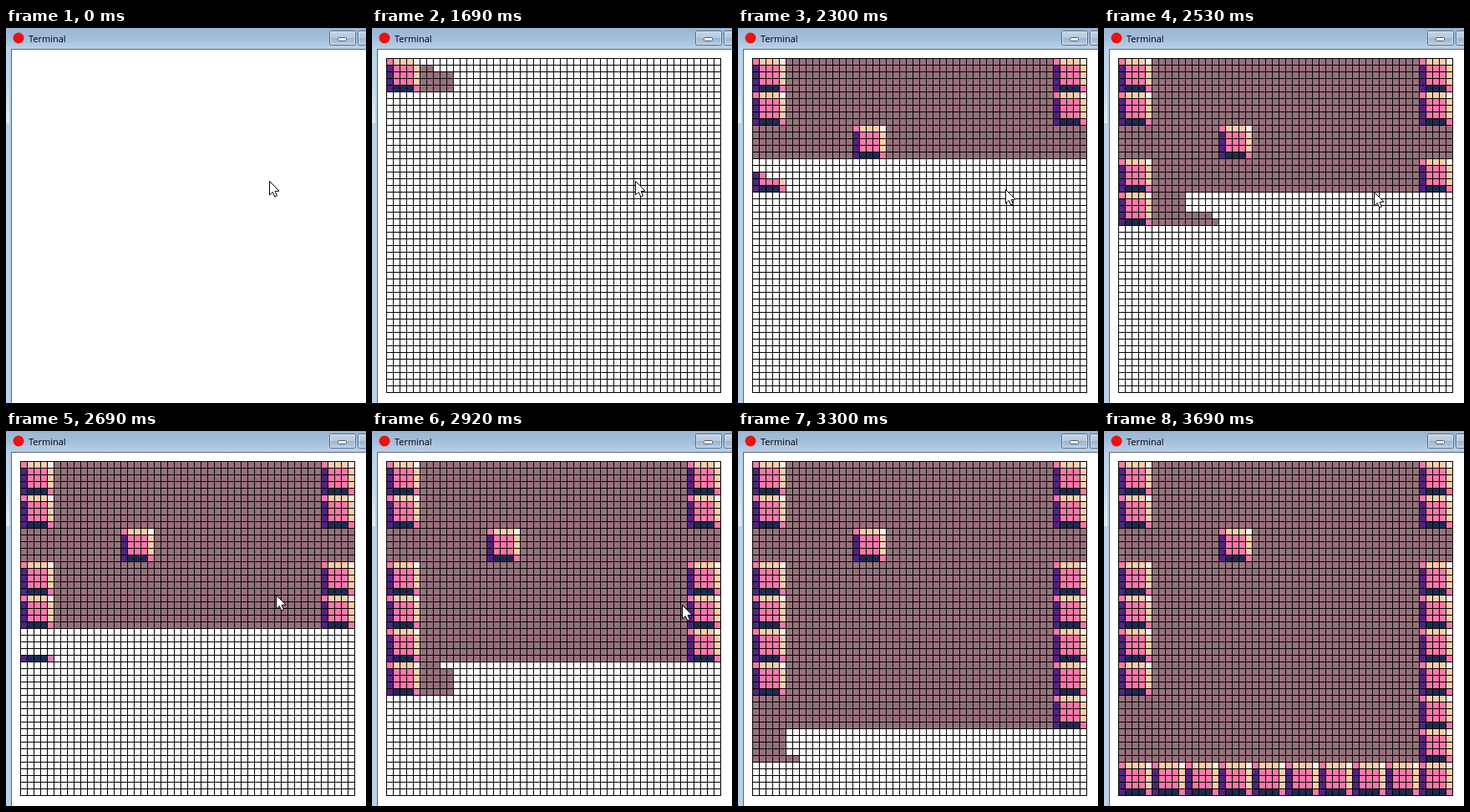
Write an HTML page with a canvas that moves like this. It is 431x449 px and loops after 4300 ms.

```html
<!DOCTYPE html>
<html lang="en">
<head>
<meta charset="utf-8">
<title>Tile map</title>
<style>
  html, body { margin: 0; width: 100%; height: 100%; overflow: hidden; background: #fff; }
  canvas { display: block; }
</style>
</head>
<body>
<canvas id="stage" width="431" height="449"></canvas>
<script>
const ctx = document.getElementById("stage").getContext("2d");
const W = 431, H = 449, LOOP = 4300;
const LEFT = 17, TOP = 36, CELL = 8, SIDE = 50, TILE = 5, PER_TILE = TILE * TILE;
const FIRST = 22; // tick at which the grid appears, 13 ticks a second

const COLORS = { k: "#ff77a8", p: "#ffccaa", w: "#fff1e8", u: "#50247f", n: "#1d2b53", f: "#98717c" };
const WALL = ["kpppw", "ukkkp", "ukkkp", "ukkkp", "unnnk"];
const MAP = [
  "#........#",
  "#........#",
  "...#......",
  "#........#",
  "#........#",
  "#........#",
  "#........#",
  ".........#",
  ".........#",
  "##########"
];

// [tick, value...]
const FILL = [[22, 42], [26, 367], [33, 1059], [38, 1548], [43, 2027], [48, 2500]];
const POINTER = [[22, 315, 183], [26, 315, 189], [33, 323, 196], [35, 323, 196], [38, 371, 208], [41, 434, 224]];

function sample(keys, tick) {
  if (tick <= keys[0][0]) return keys[0].slice(1);
  for (let i = 1; i < keys.length; i++) {
    const a = keys[i - 1], b = keys[i];
    if (tick <= b[0]) {
      const u = (tick - a[0]) / (b[0] - a[0]);
      return a.slice(1).map((v, j) => Math.round(v + (b[j + 1] - v) * u));
    }
  }
  return keys[keys.length - 1].slice(1);
}

function rect(x, y, w, h, fill) {
  ctx.fillStyle = fill;
  ctx.fillRect(x, y, w, h);
}

function vertical(y0, y1, ...stops) {
  const g = ctx.createLinearGradient(0, y0, 0, y1);
  stops.forEach(([at, color]) => g.addColorStop(at, color));
  return g;
}

function drawButton(x, w) {
  ctx.beginPath();
  ctx.roundRect(x + .5, 3.5, w - 1, 17, 2);
  ctx.fillStyle = vertical(3, 21, [0, "#c6d6e7"], [.48, "#b5c9de"], [.5, "#9bb4d0"], [1, "#b9d0e8"]);
  ctx.fill();
  ctx.lineWidth = 1;
  ctx.strokeStyle = "#596b80";
  ctx.stroke();
  ctx.beginPath();
  ctx.roundRect(x + 1.5, 4.5, w - 3, 15, 1);
  ctx.strokeStyle = "rgba(255,255,255,.45)";
  ctx.stroke();
}

function drawWindow() {
  rect(0, 0, W, H, "#b9d1ea");
  rect(0, 0, W, 25, vertical(0, 25, [0, "#9ab5d2"], [.5, "#a4bedb"], [1, "#b9d1ea"]));
  rect(0, 25, 4, 89, vertical(25, 114, [0, "#b9d1ea"], [.5, "#c6daef"], [1, "#e2edf8"]));
  rect(6, 25, W, H, "#5c656e");
  rect(7, 26, W, H, "#fff");

  ctx.fillStyle = "#ee1111";
  ctx.beginPath();
  ctx.arc(15, 12, 6.5, 0, 7);
  ctx.fill();

  ctx.fillStyle = "#000";
  ctx.font = '11px "Open Sans", "Noto Sans", sans-serif';
  ctx.fillText("Terminal", 27, 17);

  drawButton(387, 32);
  drawButton(421, 32);
  ctx.beginPath();
  ctx.roundRect(397.5, 11.5, 10, 4, 1);
  ctx.fillStyle = "#fff";
  ctx.fill();
  ctx.strokeStyle = "#535a66";
  ctx.stroke();
}

// Tiles go row by row; inside a tile, cells go from the bottom line up.
function drawCells(count) {
  for (let i = 0; i < count; i++) {
    const tile = Math.floor(i / PER_TILE), n = i % PER_TILE;
    const tx = tile % 10, ty = Math.floor(tile / 10);
    const cx = n % TILE, cy = TILE - 1 - Math.floor(n / TILE);
    const color = MAP[ty][tx] === "#" ? WALL[cy][cx] : "f";
    rect(LEFT + (tx * TILE + cx) * CELL, TOP + (ty * TILE + cy) * CELL, CELL, CELL, COLORS[color]);
  }
}

function drawGrid() {
  const size = SIDE * CELL + 1;
  for (let i = 0; i <= SIDE; i++) {
    rect(LEFT + i * CELL, TOP, 1, size, "#000");
    rect(LEFT, TOP + i * CELL, size, 1, "#000");
  }
}

function drawPointer(x, y) {
  const shape = [[0, 0], [0, 16.5], [3.8, 13], [6.3, 18.6], [9, 17.4], [6.6, 12], [11.5, 11.6]];
  ctx.beginPath();
  shape.forEach(([dx, dy]) => ctx.lineTo(x + .5 + dx, y + .5 + dy));
  ctx.closePath();
  ctx.fillStyle = "#fff";
  ctx.fill();
  ctx.lineWidth = 1;
  ctx.strokeStyle = "#000";
  ctx.stroke();
}

function draw(t) {
  // Ticks fall on whole hundredths of a second, rounded down.
  const tick = Math.ceil((Math.floor(t / 10) + 1) * 13 / 100) - 1;
  drawWindow();
  if (tick >= FIRST) {
    drawCells(sample(FILL, tick)[0]);
    drawGrid();
  }
  drawPointer(...sample(POINTER, tick));
}

function loop() {
  draw(performance.now() % LOOP);
  requestAnimationFrame(loop);
}
loop();
</script>
</body>
</html>
```
